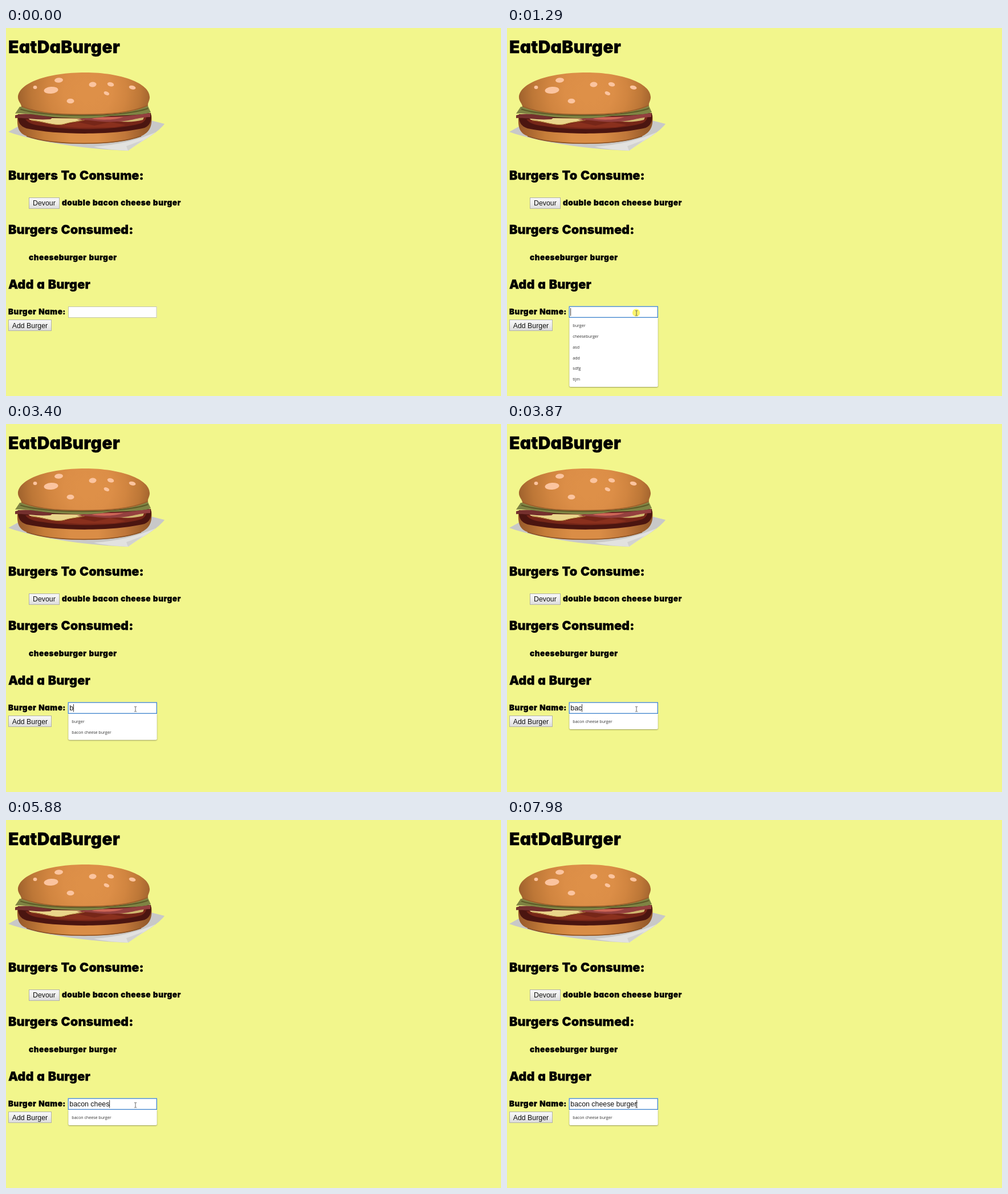
Recreate the animation shown at these times as an HTML page with a canvas. Size 868 by 645 pixels, loop 8000 ms.

```html
<!DOCTYPE html>
<html lang="en">
<head>
<meta charset="utf-8">
<title>Burger list</title>
<style>
  html, body { margin: 0; width: 100%; height: 100%; overflow: hidden; background: #f2f68c; }
  canvas, svg { position: absolute; left: 0; top: 0; width: 868px; height: 645px; }
  text { white-space: pre; }
  .head {
    font-family: Inter, "Open Sans", sans-serif; font-weight: 900;
    font-feature-settings: "cv11"; fill: #000; stroke: #000; stroke-width: .35px;
  }
  .title { font-size: 30px; letter-spacing: .25px; }
  .section { font-size: 21.6px; letter-spacing: .1px; word-spacing: 1.2px; }
  .item { font-size: 13.5px; letter-spacing: .55px; word-spacing: .6px; }
  .ui { font: 12.35px "Liberation Sans", Arial, sans-serif; fill: #111; }
  .hint { font: 7.1px "Open Sans", "Noto Sans", sans-serif; fill: #333; }
</style>
</head>
<body>
<canvas id="stage" width="868" height="645"></canvas>
<svg viewBox="0 0 868 645">
  <g class="head">
    <text class="title" x="4" y="44">EatDaBurger</text>
    <g class="section">
      <text x="4" y="265.5">Burgers To Consume:</text>
      <text x="4" y="361">Burgers Consumed:</text>
      <text x="4" y="456.5">Add a Burger</text>
    </g>
    <g class="item">
      <text x="98" y="311">double bacon cheese burger</text>
      <text x="40" y="406.5">cheeseburger burger</text>
      <text x="4" y="502">Burger Name:</text>
    </g>
  </g>
  <g class="ui">
    <text x="47" y="311">Devour</text>
    <text x="10.7" y="525.5">Add Burger</text>
    <text id="typed" x="111.3" y="502"></text>
  </g>
  <g id="hints" class="hint"></g>
</svg>
<script>
const LOOP = 8000;
const ctx = document.getElementById('stage').getContext('2d');
const typed = document.getElementById('typed');
const hintBox = document.getElementById('hints');

const PHRASE = 'bacon cheese burger';
const KEYS = [3400, 3550, 3870, 4330, 4480, 4650, 4870, 4950, 5180, 5330,
  5880, 6110, 6590, 7290, 7440, 7670, 7820, 7900, 7980];
const CARET_OFF = [[1840, 2300], [2850, 3400], [7120, 7290]];
const FOCUS = 1290, UNCLICK = 1380;
const ROW = 18.8;
const HISTORY = ['burger', 'cheeseburger', 'asd', 'add', 'sdfg', 'tijm'];

function fill(path, color) {
  ctx.fillStyle = color;
  ctx.fill(new Path2D(path));
}

function line(path, color, width) {
  ctx.strokeStyle = color;
  ctx.lineWidth = width;
  ctx.stroke(new Path2D(path));
}

function ramp(gradient, colors) {
  colors.forEach((c, i) => gradient.addColorStop(i / (colors.length - 1), c));
  return gradient;
}

function box(x, y, w, h, color, edge, width = 1) {
  ctx.fillStyle = color;
  ctx.fillRect(x, y, w, h);
  ctx.strokeStyle = edge;
  ctx.lineWidth = width;
  ctx.strokeRect(x + width / 2, y + width / 2, w - width, h - width);
}

function button(x, y, w) {
  const g = ramp(ctx.createLinearGradient(0, y, 0, y + 20), ['#f8f8f8', '#eeeeee', '#dadada']);
  box(x, y, w, 20, g, '#b2b2a6');
}

function seed(x, y, rx, ry, turn = 0) {
  ctx.fillStyle = '#fbc49f';
  ctx.beginPath();
  ctx.ellipse(x, y, rx, ry, turn, 0, 7);
  ctx.fill();
}

function burger() {
  // paper
  fill('M4 182 L24 171 L250 161 L278 168 C262 188 235 199 214 215 C150 213 60 202 4 182Z', '#c8c8c8');
  fill('M154 208 C195 205 228 197 262 183 C246 195 230 203 214 215 C194 214 172 212 154 208Z', '#e2e2e0');
  fill('M214 215 L211 207 L241 196Z', '#d2d2d0');

  // lower bun
  const crust = ramp(ctx.createLinearGradient(20, 0, 256, 0),
    ['#96582a', '#c67d39', '#da8d46', '#da8d46', '#c0773a', '#8d5426']);
  fill('M20 156 C19 176 23 185 38 190 C82 207 188 208 236 190 C252 183 257 172 255 153Z', crust);
  line('M36 189.5 C82 206 188 207 237 189.5', '#8a5122', 1.5);

  // patty
  fill('M21 151 C20 164 24 172 36 176 C90 188 190 188 243 175 C254 170 256 160 254 149Z', '#4b1510');
  fill('M34 160 C40 168 50 170 66 172 C115 180 195 179 237 167 C244 164 247 158 246 153Z', '#762618');
  fill('M92 172 L126 165 L155 171 L183 165 L210 170 L190 174 L130 175Z', '#8a301d');

  // cheese
  fill('M38 157 L140 159 C126 164 116 164 104 168 C86 173 72 164 42 161Z', '#e9d58b');
  line('M44 162 C72 165 84 172 101 168.5 C115 164 126 165 138 161', '#b78a3d', 1);
  fill('M182 161 L243 154 L240 161 C222 166 202 165 182 161Z', '#d0b870');

  // bacon
  fill('M16 153 C36 147 56 153 82 157 L78 160 C50 162 36 157 16 158Z', '#75302e');
  fill('M124 161 C150 154 190 157 222 153 L253 149 L253 156 C228 157 222 163 194 164 C168 166 146 160 124 161Z', '#94403f');
  fill('M150 159 C168 155 190 157 206 156 C194 161 168 162 150 159Z', '#cf6657');

  // lettuce
  fill('M16 150 L24 138 L249 137 L254 148 C236 153 210 153 184 154 C146 160 122 158 98 157 C65 156 40 148 16 150Z', '#7f8443');
  line('M25 142 C62 156 200 158 249 141', '#5d5a28', 2);

  // upper bun
  const crown = 'M21 122 C21 96 74 78 139 78 C202 78 252 97 252 121 C252 128 248 131 249 136 '
    + 'C220 150 180 152 138 152 C91 152 52 149 27 138 C27 133 21 128 21 122Z';
  const glow = ctx.createRadialGradient(146, 112, 16, 138, 110, 122);
  fill(crown, ramp(glow, ['#de9048', '#dc8e47', '#d18540', '#bd7737', '#9a5e2b']));
  line('M27 137 C60 151 100 151.5 138 151.5 C180 151.5 218 149 249 135.5', '#9a5e2b', 1.6);

  seed(92.5, 91.5, 7.5, 4.3, -.1);
  seed(79, 109, 12.5, 6, -.08);
  seed(51, 104, 3.4, 3);
  seed(113, 128, 6.5, 4.3);
  seed(152, 99, 6.5, 4.5, -.1);
  seed(183.5, 98.7, 5.8, 3.6, .25);
  seed(176.3, 114.5, 5, 3.1, .4);
  seed(221.5, 104.3, 6, 3.3, .25);
}

function arrow(x, y) {
  const p = `M${x} ${y} v12 l2.8 -2.6 l1.9 4.2 l1.7 -.8 l-1.9 -4 h3.8Z`;
  fill(p, '#fff');
  line(p, '#000', .8);
}

function beam(x, y) {
  line(`M${x - 2} ${y - 4} h1.5 l.5 .5 l.5 -.5 h1.5 M${x} ${y - 3.5} v7.5 `
    + `M${x - 2} ${y + 4.5} h1.5 l.5 -.5 l.5 .5 h1.5`, '#555', .9);
}

function pointer(t) {
  if (t < 290) return;
  if (t >= 1140) return beam(227, 499.5);
  const k = Math.min(10, Math.floor((t - 290) / 77)) / 10;
  const p = 1 - (1 - k) ** 2;
  const x = 783 - 552 * p;
  const y = 636 - 135.5 * p + 68 * p * (1 - p);
  if (x < 264 && y < 508) beam(x, y);
  else arrow(x, y);
}

function suggestions(count) {
  return count === 0 ? HISTORY
    : count === 1 ? ['burger', PHRASE]
    : [PHRASE];
}

function dropdown(rows) {
  const h = 8.7 + ROW * rows;
  ctx.save();
  ctx.shadowColor = 'rgba(0,0,0,.45)';
  ctx.shadowBlur = 2;
  ctx.shadowOffsetY = .8;
  ctx.fillStyle = '#fff';
  ctx.beginPath();
  ctx.roundRect(109.3, 508, 155.4, h - .5, [0, 0, 2, 2]);
  ctx.fill();
  ctx.restore();
}

let shown = null;
function showHints(list) {
  const key = list.join();
  if (key === shown) return;
  shown = key;
  hintBox.innerHTML = list.map((s, i) =>
    `<text x="115.3" y="${524.2 + ROW * i}">${s}</text>`).join('');
}

function draw(t) {
  ctx.fillStyle = '#f2f68c';
  ctx.fillRect(0, 0, 868, 645);
  burger();
  button(40, 297, 54);
  button(4, 511, 76);

  const focused = t >= FOCUS;
  const count = KEYS.filter(k => k <= t).length;
  const list = focused ? suggestions(count) : [];
  typed.textContent = PHRASE.slice(0, count);
  showHints(list);

  if (focused) {
    dropdown(list.length);
    box(108.5, 487.5, 156.5, 20.5, '#fff', '#4a8ad0', 1.4);
    if (t < UNCLICK) {
      ctx.fillStyle = '#fbf46c';
      ctx.beginPath();
      ctx.arc(226.5, 499, 6.7, 0, 7);
      ctx.fill();
    }
    if (!CARET_OFF.some(([a, b]) => t >= a && t < b)) {
      ctx.font = '12.35px "Liberation Sans", Arial, sans-serif';
      ctx.fillStyle = '#222';
      ctx.fillRect(111.2 + ctx.measureText(PHRASE.slice(0, count)).width, 491, .9, 13.5);
    }
  } else {
    box(109, 488, 155.5, 20, '#fefefe', '#c3c5a8');
  }
  pointer(t);
}

const start = performance.now();
function tick() {
  draw((performance.now() - start) % LOOP);
  requestAnimationFrame(tick);
}
tick();
</script>
</body>
</html>
```
